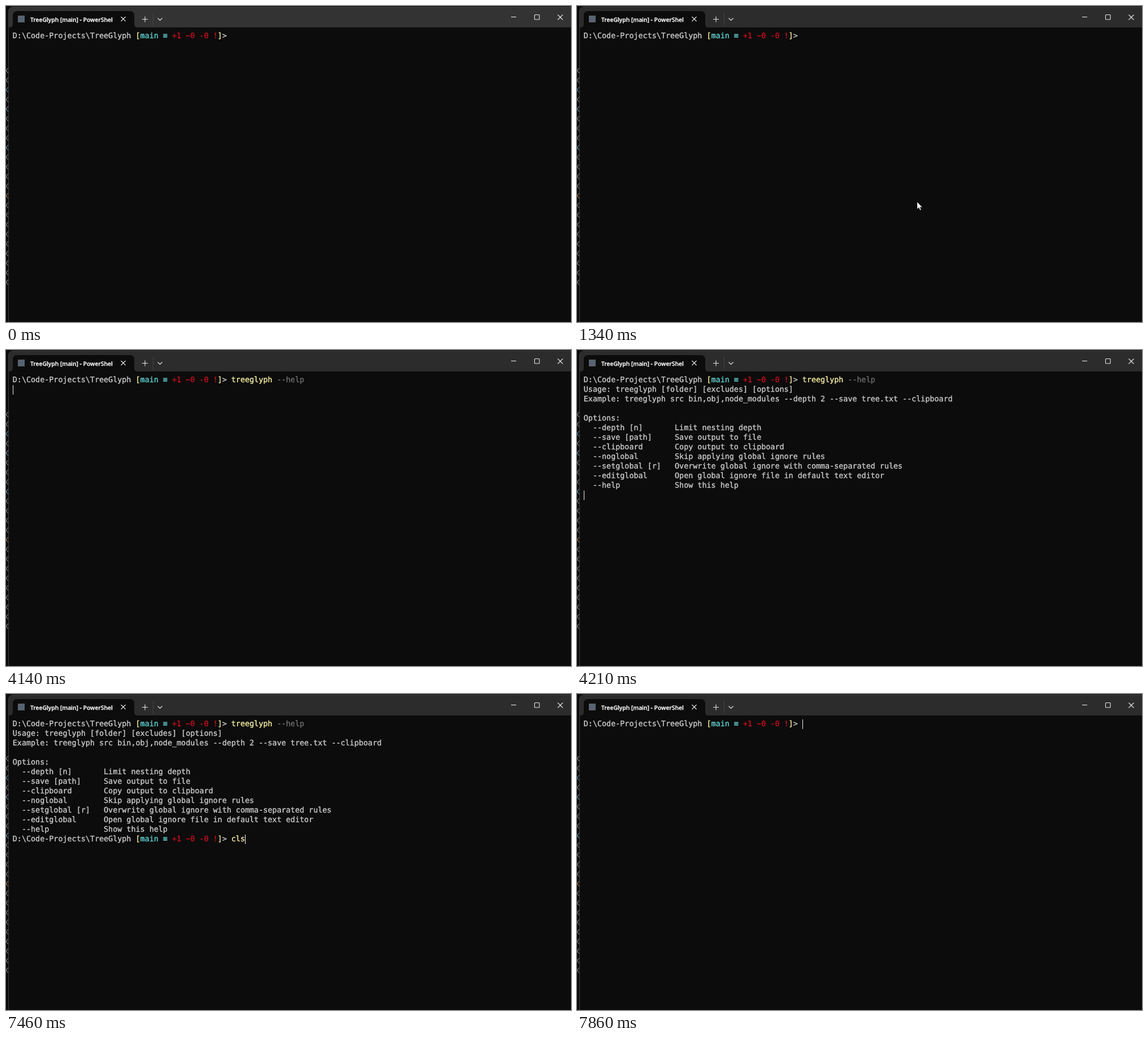
These frames come from a looping animation (1000x560 px, 8 s). An HTML page:

```html
<!DOCTYPE html>
<html lang="en">
<head>
<meta charset="utf-8">
<title>Terminal help demo</title>
<style>
  html, body { margin: 0; width: 100%; height: 100%; overflow: hidden; background: #0c0c0c; }
  #stage { position: relative; width: 1000px; height: 560px; overflow: hidden; background: #0c0c0c; }
  #stage svg { position: absolute; left: 0; top: 0; }
  #tabTitle {
    font: 600 10.3px "Open Sans", "Noto Sans", sans-serif;
    fill: #fff; stroke: #fff; stroke-width: .3px; text-rendering: geometricPrecision;
  }
  #screen {
    position: absolute; left: 11.8px; top: 45px; margin: 0;
    font: 13.4px/17px "DejaVu Sans Mono", monospace; text-rendering: geometricPrecision;
    -webkit-text-stroke: .35px; color: #ccc; white-space: pre;
  }
  .yellow { color: #f9f1a5; }
  .cyan { color: #61d6d6; }
  .red { color: #c50f1f; }
  .gray { color: #6e6e6e; }
  .ghost { color: #707070; font-style: italic; }
  #caret { position: absolute; width: 1px; height: 17px; background: #eee; }
</style>
</head>
<body>
<div id="stage">
  <svg width="1000" height="560" fill="none">
    <g id="behind"></g>
    <path d="M4.5 560V9.5a8 8 0 0 1 8-8H1000V560Z" fill="#0c0c0c"/>
    <path id="titleBar" d="M4.5 38V9.5a8 8 0 0 1 8-8H1000V38Z"/>
    <path d="M4.5 560V9.5a8 8 0 0 1 8-8H1000" stroke="#3d3d3d"/>
    <path d="M6 38q6 0 6-6V17q0-8 8-8H219q8 0 8 8V32q0 6 6 6Z" fill="#0c0c0c"/>
    <rect x="21" y="17" width="12" height="12" fill="#596471"/>
    <text id="tabTitle" x="43" y="27.5">TreeGlyph [main] - PowerShel</text>
    <path d="M260.5 13V34" stroke="#454545"/>
    <g stroke="#e8e8e8" stroke-width="1.1">
      <path d="M203.5 19l8 8m0-8l-8 8"/>
      <path d="M241 23.5h10m-5-5v10"/>
      <path d="M268.5 21.5l4 4 4-4"/>
      <path d="M894 19.5h9"/>
      <rect x="935.5" y="15.5" width="8.5" height="8.5" rx="1"/>
      <path d="M976.5 15.5l9 9m0-9l-9 9"/>
    </g>
  </svg>
  <pre id="screen"></pre>
  <div id="caret"></div>
  <svg width="1000" height="560">
    <path id="mouse" d="M0 0V13L3 10.3 5.2 15 7.2 14.2 5.1 9.7H9.2Z" fill="#fff" stroke="#000" stroke-width=".5"/>
  </svg>
</div>
<script>
const LOOP = 8000, CELL = 8.07, LEFT = 11.8, TOP = 45, ROW = 17, PROMPT_LENGTH = 48;
const byId = id => document.getElementById(id);
const span = (style, text) => `<span class="${style}">${text}</span>`;

const prompt = "D:\\Code-Projects\\TreeGlyph " + span("yellow", "[") + span("cyan", "main ≡ ") +
  span("red", "+1 ~0 -0 !") + span("yellow", "]") + "&gt; ";
const command = span("yellow", "treeglyph") + span("gray", " --help");
const help = `Usage: treeglyph [folder] [excludes] [options]
Example: treeglyph src bin,obj,node_modules --depth 2 --save tree.txt --clipboard

Options:
  --depth [n]       Limit nesting depth
  --save [path]     Save output to file
  --clipboard       Copy output to clipboard
  --noglobal        Skip applying global ignore rules
  --setglobal [r]   Overwrite global ignore with comma-separated rules
  --editglobal      Open global ignore file in default text editor
  --help            Show this help
`;
const output = prompt + command + "\n" + help;

const scene = (start, html, col = PROMPT_LENGTH, row = 0) => ({ start, html, col, row });
const typing = (start, text, count, before = "", row = 0, hint = true) => scene(
  start,
  before + prompt + span("yellow", text.slice(0, count)) + (hint ? span("ghost", text.slice(count)) : ""),
  PROMPT_LENGTH + count, row);

const suggestion = "treeglyph --help";
const scenes = [
  scene(0, prompt),
  typing(1600, suggestion, 1),
  typing(1870, suggestion, 2),
  typing(2130, suggestion, 3),
  typing(2260, suggestion, 4),
  scene(3750, prompt + command, PROMPT_LENGTH + suggestion.length),
  scene(4140, prompt + command, 0, 1),
  scene(4210, output, 0, 12),
  scene(4280, output + prompt, PROMPT_LENGTH, 12),
  typing(6930, "cls", 1, output, 12, false),
  typing(7000, "cls", 1, output, 12),
  typing(7330, "cls", 2, output, 12),
  typing(7460, "cls", 3, output, 12),
  scene(7790, "", 0),
  scene(7860, prompt)
];
const caretHidden = [[0, 800], [1340, 1600], [2930, 3480], [4810, 5340], [5870, 6400]];
const within = (t, [from, to]) => t >= from && t < to;

// Sliver of the editor window showing behind the terminal.
const edgeColors = { 2: "#61b8c4", 4: "#8fc3cc", 8: "#8fc3cc", 13: "#c9a95c" };
byId("behind").innerHTML = Array.from({ length: 23 }, (_, i) =>
  `<path d="M4 ${110 + i * 17.05}q-6.5 4.5 0 9" stroke="${edgeColors[i] || "#aaa"}"/>`).join("");

function moveMouse(t) {
  const progress = Math.min(1, Math.floor((t - 330) / 67) / 7);
  const rest = (1 - progress) ** 2;
  const mouse = byId("mouse");
  mouse.setAttribute("transform", `translate(${602 + 326 * rest} ${347 + 168 * rest})`);
  mouse.style.display = within(t, [330, 1600]) ? "" : "none";
}

let shown;
function draw(now) {
  const t = now % LOOP;
  const current = scenes.findLast(s => s.start <= t);
  if (current !== shown) {
    shown = current;
    byId("screen").innerHTML = current.html;
  }
  const caret = byId("caret");
  caret.style.left = Math.round(LEFT + current.col * CELL) + "px";
  caret.style.top = TOP + current.row * ROW + "px";
  caret.style.display = caretHidden.some(range => within(t, range)) ? "none" : "";
  byId("titleBar").setAttribute("fill", t < 800 ? "#333" : "#2c2c2c");
  moveMouse(t);
}

const begin = performance.now();
function tick() {
  draw(performance.now() - begin);
  requestAnimationFrame(tick);
}
tick();
</script>
</body>
</html>
```
